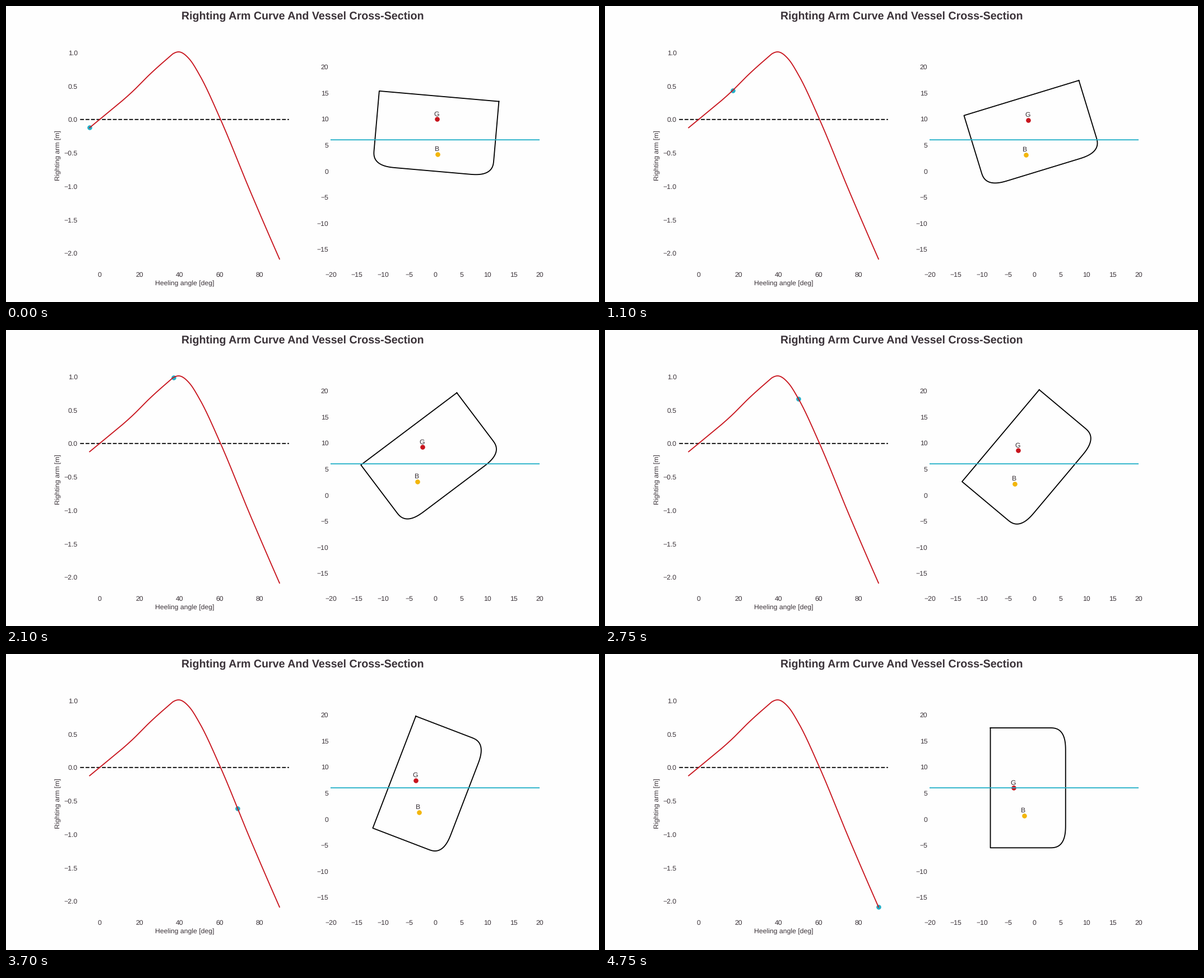
Recreate the animation shown at these times as a matplotlib script. Size 1058 by 529 pixels, loop 4800 ms.

```python
import numpy as np
import matplotlib.pyplot as plt
from matplotlib.animation import FuncAnimation

INK, RED, TEAL, GOLD = "#3a3238", "#c8141d", "#22afc7", "#f3b60b"
FRAMES, INTERVAL = 96, 50
START_ANGLE = -5
WATERLINE = 6.0
G_HEIGHT = 10.0
HALF_BEAM, DECK = 11.5, 14.4

# Heeling angle and righting arm at the turning points of the curve.
ARM_KEYS = np.array([(-5, -.123), (0, 0), (17, .433), (25, .672), (34, .913),
                     (37, .988), (39.5, 1.011), (45, .9), (50, .665),
                     (60.5, 0), (75, -1.048), (90, -2.088)])

plt.rcParams.update({
    "font.family": "Liberation Sans",
    "font.size": 10,
    "text.color": INK,
    "text.hinting": "none",
    "axes.labelcolor": INK,
    "xtick.color": INK,
    "ytick.color": INK,
    "xtick.major.size": 0,
    "ytick.major.size": 0,
    "figure.facecolor": "#fefefe",
    "axes.facecolor": "#fefefe",
    "lines.linewidth": 1.5,
})


def righting_arm(angle):
    """Cubic Hermite curve through the key points."""
    xs, ys = ARM_KEYS.T
    slopes = np.gradient(ys, xs, edge_order=2)
    i = np.clip(np.searchsorted(xs, angle, side="right") - 1, 0, len(xs) - 2)
    h = xs[i + 1] - xs[i]
    t = (angle - xs[i]) / h
    return ((1 + 2 * t) * (1 - t) ** 2 * ys[i] + t * (1 - t) ** 2 * h * slopes[i]
            + t * t * (3 - 2 * t) * ys[i + 1] + t * t * (t - 1) * h * slopes[i + 1])


def buoyancy_height(angle):
    u = angle / 90
    return 3.25 - 3.64 * u ** 2 + 1.04 * u ** 6


def hull_outline(width=4.5, height=3.0, power=2.7):
    """Closed section with superelliptic bilges, keel at the origin."""
    t = np.linspace(0, np.pi / 2, 40)
    x = HALF_BEAM - width * (1 - np.cos(t) ** (2 / power))
    y = height * (1 - np.sin(t) ** (2 / power))
    x, y = np.r_[HALF_BEAM, x], np.r_[DECK, y]
    return np.r_[x, -x[::-1], x[0]], np.r_[y, y[::-1], y[0]]


def heel(x, y, angle):
    """Rotate body coordinates about the centre of the waterline."""
    a = np.radians(angle)
    y = y - WATERLINE
    return x * np.cos(a) - y * np.sin(a), x * np.sin(a) + y * np.cos(a) + WATERLINE


def dot(ax, color):
    return ax.scatter([0], [0], s=36, color=color, linewidths=1, zorder=1)


fig, (arm_ax, hull_ax) = plt.subplots(1, 2, figsize=(12, 6), dpi=529 / 6)
fig.subplots_adjust(left=.125, right=.9, bottom=.11, top=.88, wspace=.2)
fig.suptitle("Righting Arm Curve And Vessel Cross-Section",
             y=.982, fontsize=16, fontweight="bold")
for ax in (arm_ax, hull_ax):
    ax.spines[:].set_visible(False)

angles = np.linspace(-5, 90, 381)
arm_ax.axhline(0, color="black", linestyle="--", snap=False)
arm_ax.plot(angles, righting_arm(angles), color=RED)
arm_ax.set(xlim=(-9.75, 94.75), ylim=(-2.243, 1.166),
           xticks=np.arange(0, 81, 20), yticks=np.arange(-2, 1.1, .5),
           xlabel="Heeling angle [deg]", ylabel="Righting arm [m]")

hull_ax.set(xlim=(-20, 20), ylim=(-18.86, 24.86),
            xticks=np.arange(-20, 21, 5), yticks=np.arange(-15, 21, 5))
hull_x, hull_y = hull_outline()
hull_line, = hull_ax.plot([], [], color="black", snap=False)
hull_ax.axhline(WATERLINE, color=TEAL, snap=False)

arm_dot = dot(arm_ax, TEAL)
g_dot, b_dot = dot(hull_ax, RED), dot(hull_ax, GOLD)
g_text, b_text = hull_ax.text(0, 0, "G"), hull_ax.text(0, 0, "B")


def place(marker, label, x, y):
    marker.set_offsets([(x, y)])
    label.set_position((x - .6, y + .6))


def update(frame):
    angle = START_ANGLE + frame
    arm = righting_arm(angle)
    arm_dot.set_offsets([(angle, arm)])
    hull_line.set_data(*heel(hull_x, hull_y, angle))
    gx, gy = heel(0, G_HEIGHT, angle)
    place(g_dot, g_text, gx, gy)
    place(b_dot, b_text, gx - arm, buoyancy_height(angle))
    return arm_dot, hull_line, g_dot, b_dot, g_text, b_text


animation = FuncAnimation(fig, update, frames=FRAMES, interval=INTERVAL,
                          repeat=True, repeat_delay=0)
plt.show()
```
